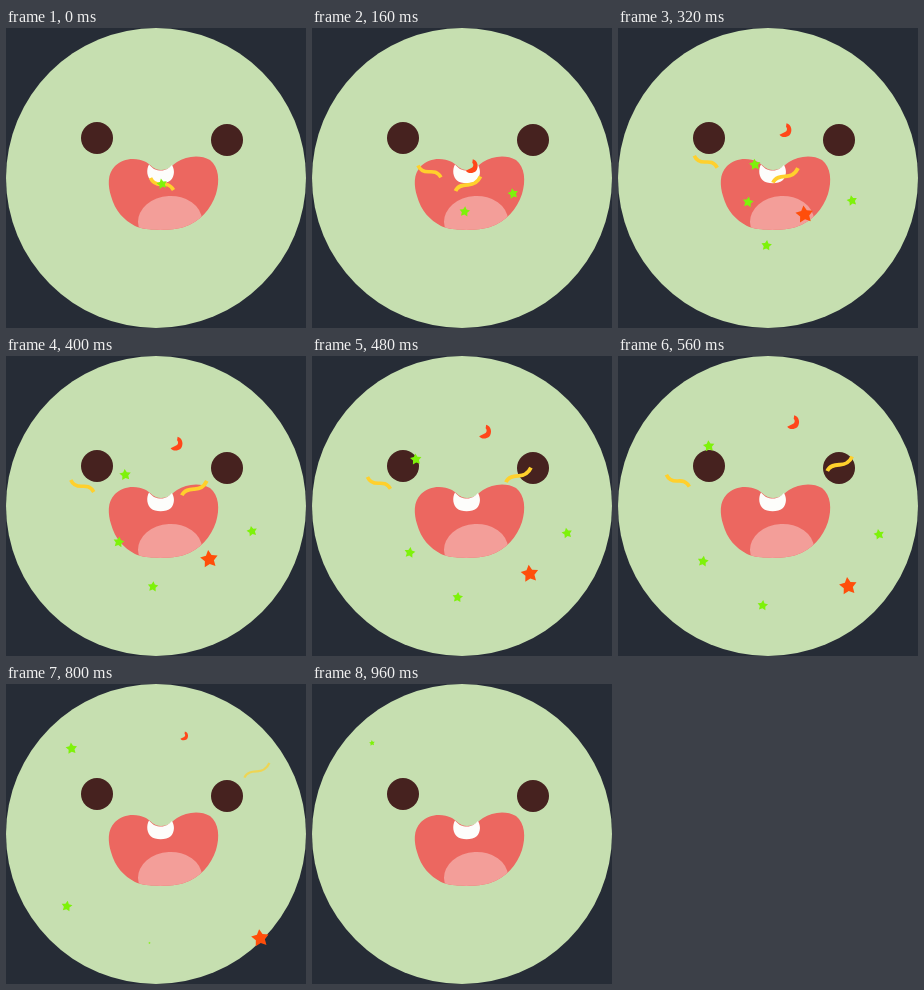
These frames come from a looping animation (300 px wide and 300 px high, 1000 ms). An HTML page with a canvas:

```html
<!DOCTYPE html>
<html>
<head>
<meta charset="utf-8">
<style>
html, body { margin: 0; width: 100%; height: 100%; overflow: hidden; background: #262c36; }
canvas { display: block; width: 100vw; height: 100vh; }
</style>
</head>
<body>
<canvas id="stage" width="300" height="300"></canvas>
<script>
const ctx = document.getElementById('stage').getContext('2d');
const LOOP = 1000, STEP = 40, SHRINK = 70;
const ORIGIN = { x: 156, y: 156 };
const GREEN = '#7ef20a', YELLOW = '#ffd02c';

const mouth = new Path2D('M155 142C148 142 145 137 140 134C130 129 117 130 109 138C101 146 102 158 105 168C109 183 118 192 129 198C140 203 165 203 178 199C194 194 205 181 210 166C214 153 213 139 204 132C194 126 180 128 171 134C165 138 163 142 155 142Z');
const tooth = new Path2D('M143 136.500C147 141 150 142.500 155 142.500C160 142.500 163 140 166 137C169 142 168.500 148 165 152C160 156.500 149 156 145 152.500C141 149 140 142 143 136.500Z');
const curl = new Path2D('M1 -7C6 -6 7.500 1 4 5C1 7.500 -4 7.500 -6 4.500L-1 2C2 1 2 -2 .5 -3.500Z');
const leftWave = new Path2D('M-11.500 -6C-9 -.5 -4 .5 0 .3S8 0 11.500 6');
const rightWave = new Path2D('M-12.500 7C-10 1 -4 1 0 .8S9 0 12.500 -7.500');

function starPath(r, turn) {
  const path = new Path2D();
  for (let i = 0; i < 10; i++) {
    const a = -Math.PI / 2 + turn + i * Math.PI / 5;
    const d = i % 2 ? r * 0.52 : r;
    path.lineTo(d * Math.cos(a), d * Math.sin(a));
  }
  path.closePath();
  return path;
}

// Times in ms; x and y are where each piece comes to rest.
const pieces = [
  { path: leftWave, color: YELLOW, line: 3.6, x: 51.8, y: 122, start: 0, stop: 776, gone: 785 },
  { path: rightWave, color: YELLOW, line: 3.8, x: 256.5, y: 82.5, show: 120, start: 280, stop: 960, gone: 840 },
  { path: curl, color: '#ff471a', x: 178.3, y: 51.7, start: 94, stop: 837, gone: 845 },
  { path: starPath(5.5, -0.2), color: GREEN, x: 264.4, y: 179.2, start: 0, stop: 680, gone: 700 },
  { path: starPath(5.5, 0.1), color: GREEN, x: 143.5, y: 259, start: 55, stop: 780, gone: 815 },
  { path: starPath(5.7, 0.15), color: GREEN, x: 56.2, y: 225.5, start: 216, stop: 960, gone: 955 },
  { path: starPath(6, -0.1), color: GREEN, x: 60, y: 59, start: 243, stop: 975, gone: 995 },
  { path: starPath(9.2, -0.12), color: '#ff4e0a', x: 259.4, y: 259.5, start: 195, stop: 975, gone: 958 }
];

const clamp = v => Math.max(0, Math.min(1, v));

function fill(path, color) {
  ctx.fillStyle = color;
  ctx.fill(path);
}

function disc(x, y, r, color) {
  ctx.beginPath();
  ctx.arc(x, y, r, 0, Math.PI * 2);
  ctx.fillStyle = color;
  ctx.fill();
}

function drawFace() {
  ctx.fillStyle = '#262c36';
  ctx.fillRect(0, 0, 300, 300);
  disc(150, 150, 150, '#c6dfb0');
  disc(91, 110, 16, '#46221f');
  disc(221, 112, 16, '#46221f');
  fill(mouth, '#ec6760');
  ctx.save();
  ctx.clip(mouth);
  ctx.beginPath();
  ctx.ellipse(164, 193, 32, 25, -0.05, 0, Math.PI * 2);
  ctx.fillStyle = '#f39e99';
  ctx.fill();
  ctx.restore();
  fill(tooth, '#fdfdfb');
}

function drawPiece(p, t) {
  if (t < (p.show ?? p.start) || t >= p.gone) return;
  const left = 1 - clamp((t - p.start) / (p.stop - p.start));
  const ease = 1 - left * left;
  const size = clamp((p.gone - t) / SHRINK);
  ctx.save();
  ctx.translate(ORIGIN.x + (p.x - ORIGIN.x) * ease, ORIGIN.y + (p.y - ORIGIN.y) * ease);
  if (p.line) {
    ctx.globalAlpha = Math.min(1, 0.3 + size * 0.7);
    ctx.strokeStyle = p.color;
    ctx.lineWidth = p.line * size;
    ctx.stroke(p.path);
  } else {
    ctx.scale(size, size);
    fill(p.path, p.color);
  }
  ctx.restore();
}

function frame() {
  const t = Math.floor(performance.now() % LOOP / STEP) * STEP;
  drawFace();
  pieces.forEach(p => drawPiece(p, t));
  requestAnimationFrame(frame);
}
frame();
</script>
</body>
</html>
```
